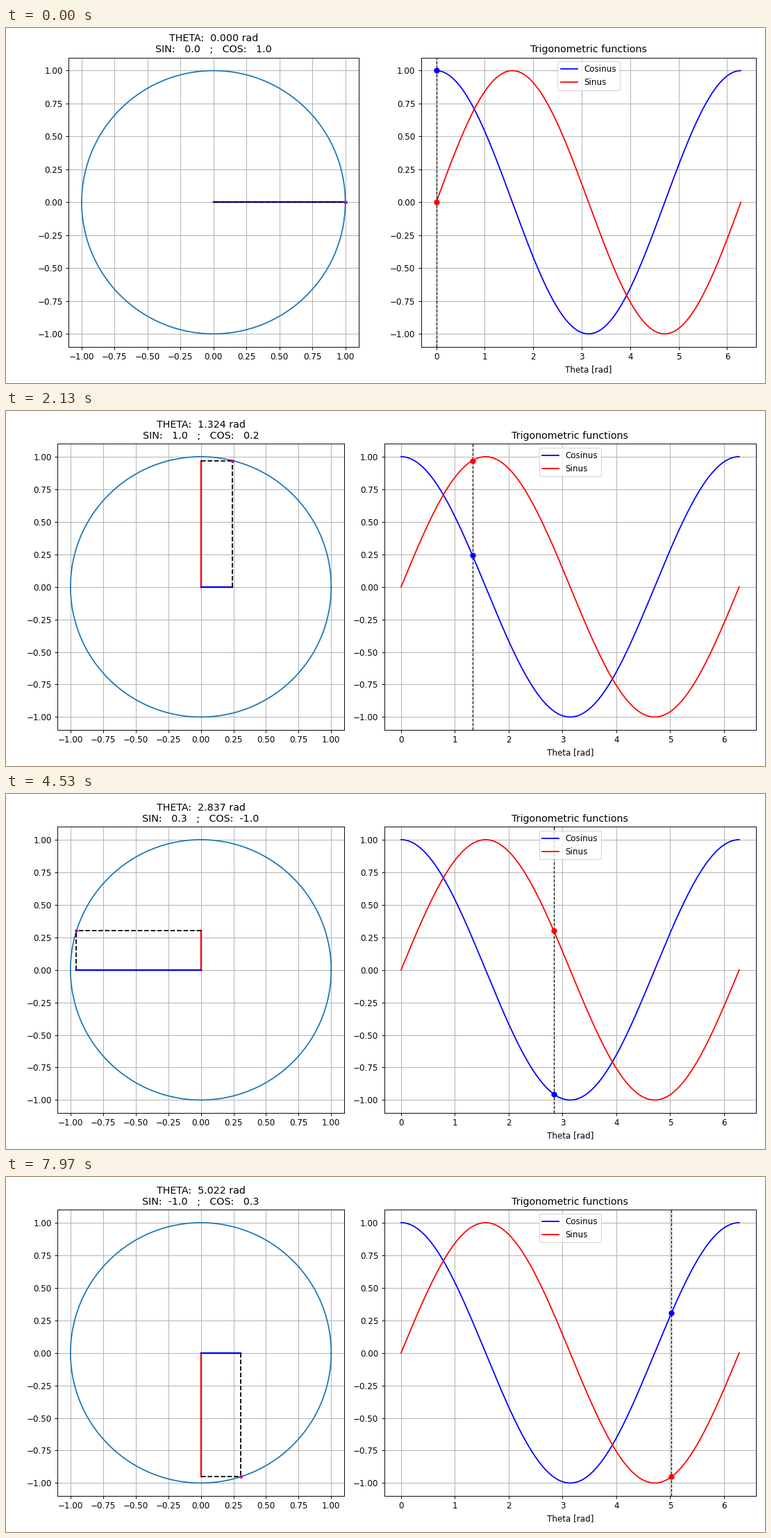
Animation, 1093 px wide and 512 px high, one loop 8 s. Source, as a matplotlib script:

```python
import matplotlib.pyplot as plt
import numpy as np
from matplotlib.animation import FuncAnimation

WIDTH, HEIGHT = 1093, 512
INCHES_HIGH = 6
FRAMES, LOOP_MS = 240, 8000

theta = np.linspace(0, 2 * np.pi, 300)

fig, (ax_circle, ax_wave) = plt.subplots(
    1, 2,
    figsize=(WIDTH * INCHES_HIGH / HEIGHT, INCHES_HIGH),
    dpi=HEIGHT / INCHES_HIGH,
)

# Unit circle with both projections
ax_circle.plot(np.cos(theta), np.sin(theta))
ax_circle.set_aspect("equal")
ax_circle.grid()
sin_bar, = ax_circle.plot([0, 0], [0, 0], "r", lw=2)
cos_bar, = ax_circle.plot([0, 1], [0, 0], "b", lw=2)
drop, = ax_circle.plot([1, 1], [0, 0], "k--")
across, = ax_circle.plot([0, 1], [0, 0], "k--")
tip, = ax_circle.plot([1], [0], "m.")
title = ax_circle.set_title("")

# Both functions over one turn
ax_wave.plot(theta, np.cos(theta), "b", label="Cosinus")
ax_wave.plot(theta, np.sin(theta), "r", label="Sinus")
cursor = ax_wave.axvline(0, color="k", ls="--", lw=1)
cos_dot, = ax_wave.plot([0], [1], "bo")
sin_dot, = ax_wave.plot([0], [0], "ro")
ax_wave.set_title("Trigonometric functions")
ax_wave.set_xlabel("Theta [rad]")
ax_wave.legend(loc="upper center")
ax_wave.grid()


def show_angle(t):
    c, s = np.cos(t), np.sin(t)
    sin_bar.set_data([0, 0], [0, s])
    cos_bar.set_data([0, c], [0, 0])
    drop.set_data([c, c], [0, s])
    across.set_data([0, c], [s, s])
    tip.set_data([c], [s])
    cursor.set_xdata([t, t])
    cos_dot.set_data([t], [c])
    sin_dot.set_data([t], [s])
    title.set_text(f"THETA:  {t:.3f} rad\nSIN: {s:5.1f}   ;   COS: {c:5.1f}")


def settle_layout(passes):
    """Margins after each tight_layout pass; they converge after a few."""
    steps = []
    for _ in range(passes):
        fig.tight_layout()
        p = fig.subplotpars
        steps.append(dict(left=p.left, right=p.right, bottom=p.bottom,
                          top=p.top, wspace=p.wspace))
    return steps


show_angle(0)
layouts = settle_layout(8)


def update(i):
    fig.subplots_adjust(**layouts[min(i, len(layouts) - 1)])
    show_angle(theta[i])


anim = FuncAnimation(fig, update, frames=FRAMES, interval=LOOP_MS / FRAMES,
                     repeat=True, repeat_delay=0, blit=False)
plt.show()
```
